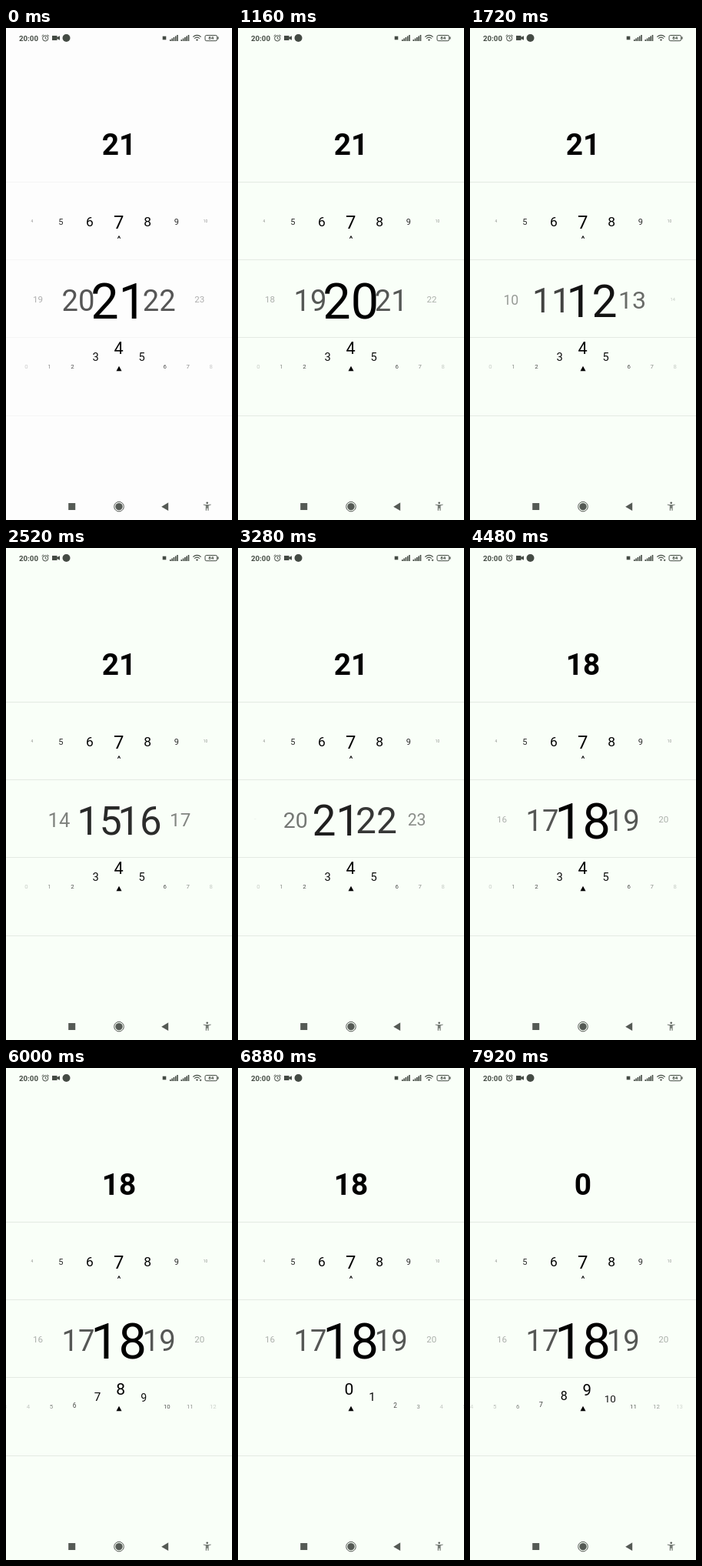
An HTML page that plays this animation: 294x640 px, repeating every 8000 ms.

```html
<!DOCTYPE html>
<html lang="en">
<head>
<meta charset="utf-8">
<title>Number pickers</title>
<style>
  html, body { margin: 0; width: 100%; height: 100%; overflow: hidden; background: #f9fff8; }
  svg { display: block; width: 294px; height: 640px; font-family: Roboto, Arial, sans-serif; text-anchor: middle; }
</style>
</head>
<body>
<svg viewBox="0 0 294 640">
  <rect id="bg" width="294" height="640"/>
  <path id="lines" d="M0 200.5H294M0 301.5H294M0 402.5H294M0 504.5H294"/>

  <g id="status" fill="#444b44" stroke="none">
    <text x="17" y="16.6" font-size="9.7" font-weight="700" text-anchor="start">20:00</text>
    <g fill="none" stroke="#444b44">
      <circle cx="51.2" cy="13.4" r="3.6"/>
      <path d="M51.2 11.2v2.4l1.6 1M46.6 10.6l2.2-1.9M55.8 10.6l-2.2-1.9"/>
    </g>
    <path d="M60 10h6.5v2l3.5-1.8v5.6l-3.5-1.8v2H60z"/>
    <circle cx="78.5" cy="13" r="5"/>
    <rect x="203.7" y="10.7" width="4.6" height="4.6"/>
    <g id="signals"></g>
    <g fill="none" stroke="#444b44" stroke-width="1.2">
      <path d="M243.3 11.6q5.2-4.4 10.4 0M245.1 13.6q3.4-2.8 6.8 0"/>
      <rect x="259" y="9.5" width="15.6" height="7.2" rx="1.8" stroke-width="1"/>
    </g>
    <path d="M246.9 15q1.6-1.2 3.2 0l-1.6 2zM275.3 11.6h1.3v3h-1.3z"/>
    <path id="traffic" d="M251.6 15h3l-1.5 2.4z"/>
    <text x="266.8" y="15.4" font-size="6.2" font-weight="700">84</text>
  </g>

  <text id="value" x="147" y="165.2" font-size="38.8" font-weight="700"></text>
  <g id="pickers"></g>
  <path d="M145.4 273.8l1.6-3 1.6 3" fill="none" stroke="#000" stroke-width="1.1"/>
  <path d="M143.5 446.3l3.5-6.6 3.5 6.6z"/>

  <g fill="#555a55">
    <rect x="81.2" y="618" width="9" height="9"/>
    <circle cx="147" cy="622.6" r="4.7"/>
    <circle cx="147" cy="622.6" r="6.3" fill="none" stroke="#555a55"/>
    <path d="M211.2 617.3v10.8l-9-5.4z"/>
    <circle cx="261.7" cy="617.8" r="1.3"/>
    <path d="M256.8 619.4q4.9 1.3 9.8 0v1.2l-3 .7v6.4h-1.2v-3h-1.4v3h-1.2v-6.4l-3-.7z" fill="#747a74"/>
  </g>
</svg>
<script>
const LOOP = 8000, MID = 146.6;
const $ = id => document.getElementById(id);

// Scroll positions over time: [ms, value]
const wheel = [[1000, 21], [1720, 11.78], [1860, 11.2], [2520, 15.47], [3280, 21.36], [3520, 22.2], [4080, 18]];
const arc = [[5400, 4], [6000, 7.91], [6180, 8.5], [6920, 0], [7360, 0], [7920, 8.81]];

// Monotone cubic interpolation, at rest on every turning point
function follow(keys, t) {
  const n = keys.length - 1;
  if (t <= keys[0][0]) return keys[0][1];
  if (t >= keys[n][0]) return keys[n][1];
  const rate = i => (keys[i + 1][1] - keys[i][1]) / (keys[i + 1][0] - keys[i][0]);
  const slope = i => {
    if (i === 0 || i === n) return 0;
    const a = rate(i - 1), b = rate(i);
    return a * b > 0 ? 2 * a * b / (a + b) : 0;
  };
  const i = keys.findIndex(k => k[0] > t) - 1;
  const [t0, v0] = keys[i], [t1, v1] = keys[i + 1];
  const h = t1 - t0, u = (t - t0) / h, w = 1 - u;
  return v0 * (1 + 2 * u) * w * w + v1 * u * u * (3 - 2 * u)
    + h * u * w * (slope(i) * w - slope(i + 1) * u);
}

// style(d) gives [size, opacity, centre y] at a distance of d items
function picker(pos, gap, style) {
  let out = '';
  const reach = 170 / gap;
  for (let n = Math.max(0, Math.ceil(pos - reach)); n <= pos + reach; n++) {
    const [size, alpha, y] = style(Math.abs(n - pos));
    if (size < 1 || alpha <= 0) continue;
    const x = MID + (n - pos) * gap;
    out += `<text x="${x.toFixed(2)}" y="${(y + size * 0.3925).toFixed(2)}" font-size="${size.toFixed(2)}" opacity="${alpha.toFixed(3)}">${n}</text>`;
  }
  return out;
}

const flatStyle = d => [23.8 - 6.4 * d, 1 - 0.02 * d ** 3, 251.5];
const wheelStyle = d => [64.8 - 26.6 * d, 1 - 0.345 * d, 352.6];
const arcStyle = d => [21.6 - 6.9 * Math.min(d, 2), Math.max(0.15, Math.min(1, 1.2 - 0.25 * d)), 415.6 + 12 * Math.min(d, 2)];

$('signals').innerHTML = [213, 227.5].map(x =>
  [0, 1, 2, 3, 4].map(i => `<rect x="${x + i * 2.3}" y="${15 - i * 1.5}" width="1.6" height="${2 + i * 1.5}"/>`).join('')
).join('');

function draw(now) {
  const t = now % LOOP, pale = t < 40;
  $('bg').setAttribute('fill', pale ? '#fdfdfd' : '#f9fff8');
  $('lines').setAttribute('stroke', pale ? '#f5f5f5' : '#e4eae3');
  $('traffic').setAttribute('opacity', t >= 3000 && t < 6100 ? 1 : 0);
  $('value').textContent = t < 4320 ? 21 : t < 7360 ? 18 : 0;
  $('pickers').innerHTML = picker(7, 37.6, flatStyle)
    + picker(follow(wheel, t), 52.6, wheelStyle)
    + picker(follow(arc, t), 30.05, arcStyle);
}

function tick() {
  draw(performance.now());
  requestAnimationFrame(tick);
}
tick();
</script>
</body>
</html>
```
